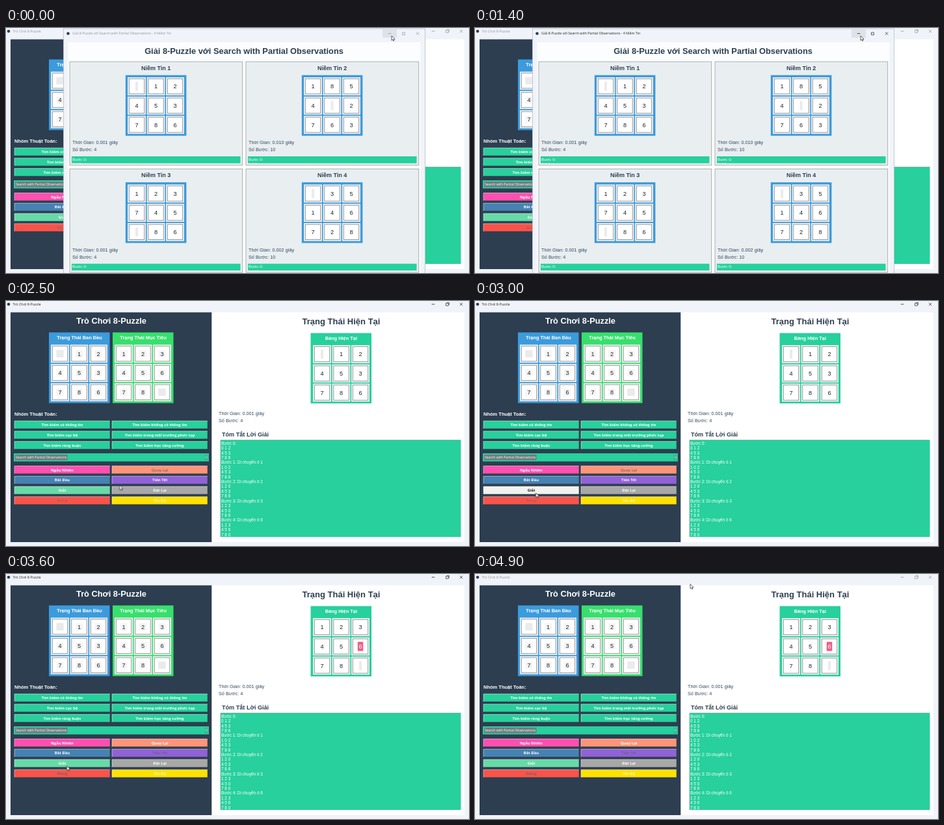
Write an HTML page that moves like this. It is 712x378 px and loops after 5 s.

```html
<!DOCTYPE html>
<html lang="vi">
<head>
<meta charset="utf-8">
<title>8-Puzzle</title>
<style>
  html, body { margin: 0; width: 100%; height: 100%; overflow: hidden; background: #f0f3f9; }
  svg { display: block; width: 712px; height: 378px; }
  text { font-family: "Liberation Sans", Arial, sans-serif; white-space: pre; }
  .ui { font-family: "Open Sans", "Noto Sans", sans-serif; }
  .b { font-weight: 700; }
</style>
</head>
<body>
<svg id="stage" viewBox="0 0 712 378"></svg>
<script>
const LOOP = 5000;
const NAVY = '#2c3e50', GREEN = '#27d09c', BLUE = '#3c9bdc', INK = '#222', FADED = '#929498';
const stage = document.getElementById('stage');

function add(parent, tag, attrs = {}, content = '') {
  const el = document.createElementNS('http://www.w3.org/2000/svg', tag);
  for (const key in attrs) el.setAttribute(key, attrs[key]);
  el.textContent = content;
  return parent.appendChild(el);
}
const group = parent => add(parent, 'g');
const path = (p, d, stroke, width = 0.8) =>
  add(p, 'path', { d, stroke, 'stroke-width': width, fill: 'none' });

function rect(p, x, y, right, bottom, fill, extra = {}) {
  return add(p, 'rect', { x, y, width: right - x, height: bottom - y, fill, ...extra });
}

// cy is the middle of the capital letters
function label(p, content, x, cy, size, fill, cls = '', anchor = 'start') {
  return add(p, 'text', { x, y: cy + size * 0.36, 'font-size': size, fill,
    class: cls, 'text-anchor': anchor }, content);
}
const centred = (p, content, x, cy, size, fill, cls = '') =>
  label(p, content, x, cy, size, fill, cls, 'middle');

// keys: [time, value, number of jumps until the next key]
function play(el, prop, keys) {
  const frames = keys.map(([time, value, jumps = 1]) =>
    ({ offset: time / LOOP, [prop]: value, easing: `steps(${jumps}, end)` }));
  frames.push({ offset: 1, [prop]: keys[keys.length - 1][1] });
  el.animate(frames, { duration: LOOP, iterations: Infinity });
}

function showBetween(el, from, to) {
  const keys = from > 0 ? [[0, 0], [from, 1]] : [[0, 1]];
  if (to < LOOP) keys.push([to, 0]);
  play(el, 'opacity', keys);
}

function tiles(p, left, top, board, { framed = false, marked = 0 } = {}) {
  [...board].forEach((digit, i) => {
    const x = left + (i % 3) * 29.5, y = top + Math.floor(i / 3) * 29.7;
    rect(p, x - 13.9, y - 13.9, x + 13.9, y + 13.9, '#f4f5f6');
    rect(p, x - 11.7, y - 11.7, x + 11.7, y + 11.7, '#fff', { stroke: '#8c8f92', 'stroke-width': 0.9 });
    if (digit === '0') {
      const [w, h] = framed ? [5.7, 5.7] : [2, 7];
      rect(p, x - w, y - h, x + w, y + h, '#ebebeb');
      return;
    }
    if (framed) rect(p, x - 5.5, y - 5.5, x + 5.5, y + 5.5, '#f5f5f5');
    const hot = +digit === marked;
    if (hot) rect(p, x - 4.2, y - 7, x + 4.2, y + 7, '#ee5d86');
    centred(p, digit, x, y, 9.2, hot ? '#fff' : INK);
  });
}

function button(p, x, y, right, bottom, fill, content, color = '#fff') {
  const face = rect(p, x, y, right, bottom, fill);
  path(p, `M${x} ${bottom}V${y}H${right}`, 'rgba(255,255,255,.55)', 0.9);
  path(p, `M${x} ${bottom}H${right}V${y}`, 'rgba(60,60,60,.55)', 0.9);
  return { face, text: centred(p, content, (x + right) / 2, (y + bottom) / 2, 5.9, color, 'ui b') };
}

function windowBar(p, x, y, title, size, right, color) {
  const bar = group(p);
  add(bar, 'circle', { cx: x, cy: y, r: 2.3, fill: NAVY });
  label(bar, title, x + 6.5, y, size, color, 'ui');
  return { bar, buttons(restored) {
    const [a, b, c] = [right - 43, right - 21.5, right];
    path(bar, `M${a - 2.3} ${y}h4.6`, color);
    path(bar, `M${b - 2} ${y - 1.6}h3.8v3.8h-3.8z`, color, 0.7);
    if (restored) path(bar, `M${b - 0.8} ${y - 2.6}h3.8v3.8`, color, 0.6);
    path(bar, `M${c - 2.2} ${y - 2.2}l4.4 4.4m0 -4.4l-4.4 4.4`, color, 0.7);
    return bar;
  } };
}

// Solution boards and its written summary
const boards = ['012453786'];
const log = ['Bước 0:'];
const logRows = b => log.push(...b.match(/.../g).map(row => [...row].join(' ')));
logRows(boards[0]);
[1, 2, 3, 6].forEach((tile, i) => {
  const swap = { 0: tile, [tile]: 0 };
  const next = [...boards[i]].map(d => swap[d] ?? d).join('');
  boards.push(next);
  log.push(`Bước ${i + 1}: Di chuyển ô ${tile}`);
  logRows(next);
});

// Main window
rect(stage, 0, 0, 712, 378, '#f0f3f9');
const mainBar = color => windowBar(stage, 4, 5, 'Trò Chơi 8-Puzzle', 5.4, 700, color).buttons(true);
play(mainBar(FADED), 'opacity', [[0, 1], [1900, 0], [4700, 1]]);
showBetween(mainBar(INK), 1900, 4700);

rect(stage, 7, 17.5, 316.5, 372, NAVY);
rect(stage, 316.5, 17.5, 705, 372, '#fff');
centred(stage, 'Trò Chơi 8-Puzzle', 162, 30.5, 12.8, '#fff', 'b');
rect(stage, 66, 48.5, 159.5, 157.5, BLUE);
centred(stage, 'Trạng Thái Ban Đầu', 113, 56, 7.4, '#fff', 'b');
tiles(stage, 83, 81.3, boards[0], { framed: true });
rect(stage, 164, 48.5, 257.5, 157.5, '#38df6d');
centred(stage, 'Trạng Thái Mục Tiêu', 211, 56, 7.4, '#fff', 'b');
tiles(stage, 181, 81.3, boards[4], { framed: true });

label(stage, 'Nhóm Thuật Toán:', 13, 174.5, 7.5, '#fff', 'b');
[['Tìm kiếm có thông tin', 'Tìm kiếm không có thông tin'],
 ['Tìm kiếm cục bộ', 'Tìm kiếm trong môi trường phức tạp'],
 ['Tìm kiếm ràng buộc', 'Tìm kiếm học tăng cường']].forEach(([a, b], i) => {
  const y = 185 + i * 15.8;
  button(stage, 13, y, 160, y + 12, GREEN, a);
  button(stage, 163, y, 310, y + 12, GREEN, b);
});

rect(stage, 12, 235, 312, 247.5, GREEN);
rect(stage, 14, 237, 94.5, 245.5, '#717d80');
label(stage, 'Search with Partial Observations', 15, 241.2, 5.2, '#fff', 'ui');
rect(stage, 305, 236, 311.5, 246.5, '#35bd95');
path(stage, 'M307 240.5l1.3 1.3l1.3 -1.3', '#fff', 0.7);

const actions = {};
[['Ngẫu Nhiên', '#ff4fb0', 'Quay Lại', '#ff9478'],
 ['Bắt Đầu', '#4682b4', 'Tiến Tới', '#9161d8'],
 ['Giải', '#66dba8', 'Đặt Lại', '#a8a8a8'],
 ['Dừng', '#f9534a', 'Tốc Độ', '#ffe100']].forEach(([a, fillA, b, fillB], i) => {
  const y = 254.5 + i * 15.8;
  actions[a] = button(stage, 13, y, 160, y + 12, fillA, a);
  actions[b] = button(stage, 163, y, 310, y + 12, fillB, b);
});
actions['Tốc Độ'].text.setAttribute('fill', '#f6f0c2');
play(actions['Quay Lại'].text, 'fill', [[0, '#85706a'], [3300, '#fff']]);
play(actions['Tiến Tới'].text, 'fill', [[0, '#fff'], [3600, '#70608c']]);
play(actions['Dừng'].text, 'fill', [[0, '#ab5c55'], [3300, '#85605a']]);
play(actions['Giải'].face, 'fill', [[0, '#66dba8'], [2800, '#f2f3ef'], [3300, '#66dba8']]);
play(actions['Giải'].text, 'fill', [[0, '#fff'], [2800, '#111'], [3300, '#fff']]);

centred(stage, 'Trạng Thái Hiện Tại', 515.5, 31, 13, NAVY, 'b');
rect(stage, 468.5, 49.5, 562, 158, GREEN);
centred(stage, 'Bảng Hiện Tại', 515.3, 57, 7.4, '#fff', 'b');
boards.forEach((board, i) => {
  const layer = group(stage);
  tiles(layer, 486, 82, board, { marked: [0, 1, 2, 3, 6][i] });
  showBetween(layer, i ? 3200 + i * 100 : 0, i < 4 ? 3300 + i * 100 : LOOP);
});
label(stage, 'Thời Gian: 0.001 giây', 327, 173, 7.3, '#34495e');
label(stage, 'Số Bước: 4', 327, 184, 7.3, '#34495e');
label(stage, 'Tóm Tắt Lời Giải', 332, 205.5, 9.1, NAVY, 'b');
rect(stage, 330, 214.5, 699.5, 364, GREEN);
path(stage, 'M330 364V214.5H699.5', '#7d9f94', 0.7);
log.forEach((line, i) => label(stage, line, 331, 219.4 + i * 7.42, 6.4, '#fff'));

// Results window
const popup = group(stage);
rect(popup, 88.5, 1, 644.5, 380, '#f0f3f9', { stroke: '#b9bec6', 'stroke-width': 0.8 });
rect(popup, 579, 1.5, 601, 15, '#dfe3e9');
const popupBar = color => windowBar(popup, 95.5, 8.5,
  'Giải 8-Puzzle với Search with Partial Observations - 4 Niềm Tin', 5.3, 633, color).buttons(false);
showBetween(popupBar(FADED), 0, 1400);
showBetween(popupBar(INK), 1400, LOOP);
rect(popup, 95.5, 22, 637.5, 378, '#fcfdfe');
centred(popup, 'Giải 8-Puzzle với Search with Partial Observations', 366, 35.5, 12.8, NAVY, 'b');

[['012453786', '0.001', 4], ['185402763', '0.010', 10],
 ['123745086', '0.001', 4], ['035146728', '0.002', 10]].forEach(([board, time, steps], i) => {
  const x = i % 2 * 271, y = i > 1 ? 165.4 : 0;
  rect(popup, x + 98, y + 52, x + 363.7, y + 211.7, '#e9eef1', { stroke: '#a3a6a9', 'stroke-width': 0.9 });
  centred(popup, `Niềm Tin ${i + 1}`, x + 230.7, y + 61.5, 9, NAVY, 'b');
  rect(popup, x + 183.8, y + 72.7, x + 277.4, y + 166.3, BLUE);
  tiles(popup, x + 201, y + 90, board);
  label(popup, `Thời Gian: ${time} giây`, x + 102, y + 176.5, 7.3, '#34495e');
  label(popup, `Số Bước: ${steps}`, x + 102, y + 187.5, 7.3, '#34495e');
  const view = add(popup, 'svg', { x: x + 101, y: y + 198, width: 259.5, height: 10.8 });
  rect(view, 0, 0, 260, 11, GREEN);
  label(view, 'Bước 0:', 1, 4.5, 6.2, '#fff');
  label(view, [...board.slice(0, 3)].join(' '), 1, 12, 6.2, '#fff');
});
showBetween(popup, 0, 1900);

// Pointer
const pointer = add(stage, 'path', { d: 'M0 0V7.2L1.7 5.7L2.8 8L3.9 7.5L2.9 5.2H5.1Z',
  fill: '#fff', stroke: '#222', 'stroke-width': 0.7 });
play(pointer, 'transform', [
  [0, 593, 12], [1900, 593, 12, 5], [2400, 202, 275, 3], [2700, 120, 303, 3],
  [3000, 93.5, 296], [3800, 101, 291], [4000, 101, 291, 4], [4400, 350, 46],
  [4500, 344, 32.5], [4600, 338, 23, 3], [4900, 331, 15.5]
].map(([time, x, y, jumps]) => [time, `translate(${x}px, ${y}px)`, jumps]));

// One shared clock for every part
const parts = document.getAnimations();
parts.forEach(part => { part.startTime = document.timeline.currentTime; });
</script>
</body>
</html>
```
